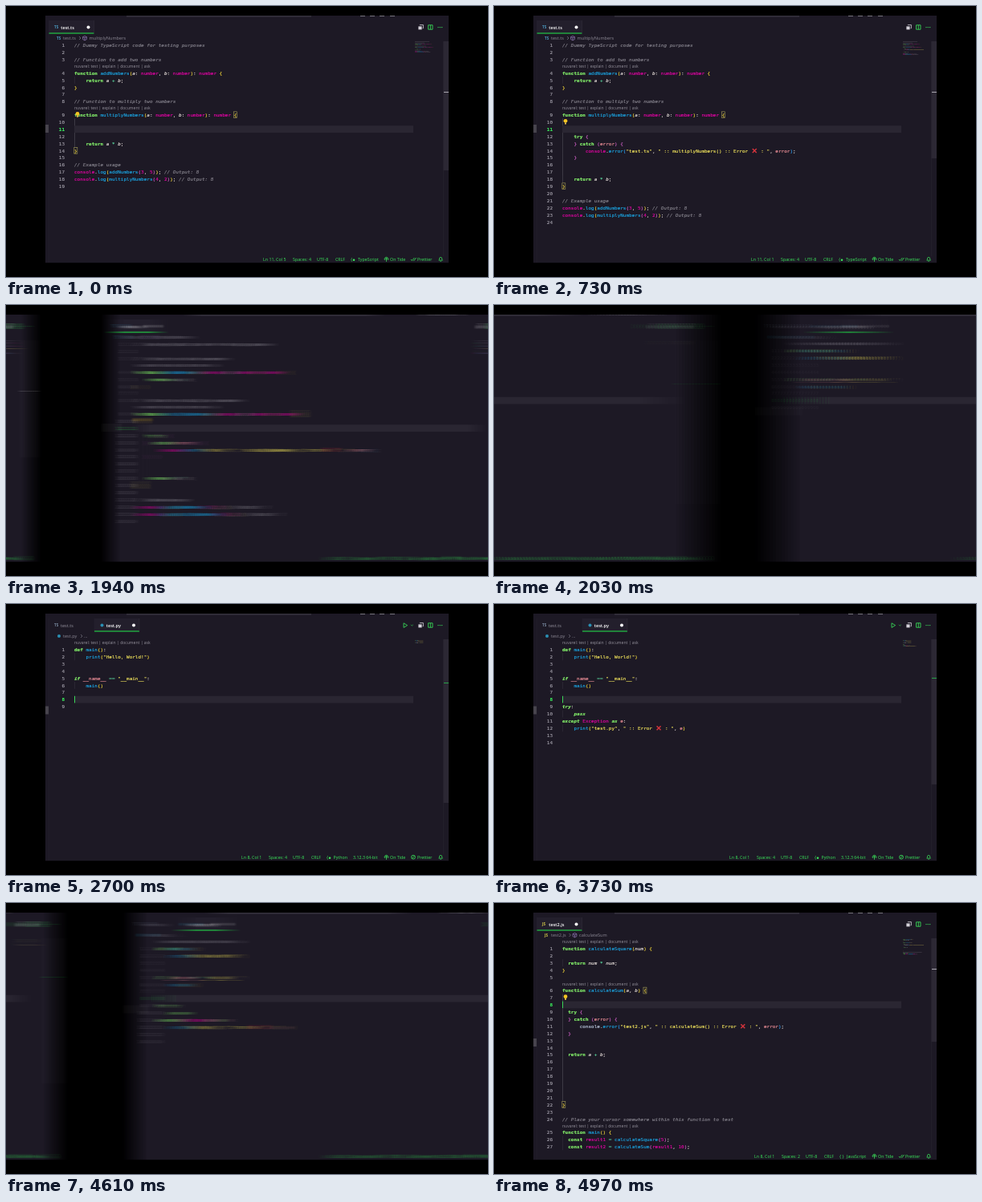
Animation, 600 px wide and 338 px high, one loop 5 s. Source, as an HTML page with a canvas:

```html
<!DOCTYPE html>
<html lang="en">
<head>
<meta charset="utf-8">
<title>Error handling snippets</title>
<style>
html, body { margin: 0; width: 100%; height: 100%; overflow: hidden; background: #000; }
canvas { display: block; }
</style>
</head>
<body>
<canvas id="stage" width="600" height="338"></canvas>
<script>
const W = 600, H = 338, LOOP = 5000;
const UI = '"Open Sans", sans-serif', MONO = '"DejaVu Sans Mono", monospace';
const CODE_X = 85, CODE_TOP = 44.6, CHAR = 3.612, LINE = 8.9, LENS = 7.8, SIZE = 6;
const BG = '#1d1925', GREEN = '#3bea5c', GREY = '#8d8a96', PALE = '#e4dcd8';
const KEY = '#86f56c', BLUE = '#1ba3e0', PINK = '#e005a2', YELLOW = '#f2e45c', ROSE = '#ea8d96';
const BRACKETS = ['#f5d93a', '#cf5fc6', '#2f9df0'];
const TOKEN = /(?<comment>\/\/.*)|(?<string>"[^"]*")|\b(?<key>function|return|def|if|const|try|catch|except|pass|as)\b|(?<call>\w+(?=\())|\b(?<type>number|Exception|console|result\d|\d+)\b|\b(?<param>a|b|num)\b|(?<word>\w+)|(?<bracket>[(){}])|(?<op>[+*=]+)|(?<rest>\s+|.)/g;
const COLORS = { comment: '#85828c', string: YELLOW, key: KEY, call: BLUE, type: PINK, param: PALE, word: ROSE, op: '#5fe6a8', rest: PALE };

let g;

function text(str, x, y, color, size = 5.6, style = '', family = UI) {
  g.save();
  g.translate(x, y + size * 0.36);
  g.scale(0.1, 0.1); // large type scaled down keeps fractional advances
  g.font = `${style} ${size * 10}px ${family}`;
  g.fillStyle = g.strokeStyle = color;
  g.fillText(str, 0, 0);
  g.lineWidth = 1.5;
  if (family === MONO) g.strokeText(str, 0, 0);
  g.restore();
}

function rect(x, y, w, h, color) {
  g.fillStyle = color;
  g.fillRect(x, y, w, h);
}

function dot(x, y, r, color) {
  g.fillStyle = color;
  g.beginPath();
  g.arc(x, y, r, 0, 7);
  g.fill();
}

function stroke(path, color, width = 0.8) {
  g.strokeStyle = color;
  g.lineWidth = width;
  g.stroke(new Path2D(path));
}

function fileIcon(s, x, y) {
  if (s.icon) text(s.icon, x - 3, y, s.tint, 4.6, 'bold');
  else dot(x, y, 2, s.tint);
}

function tokens(line, s, depth) {
  return [...line.matchAll(TOKEN)].map(m => {
    const kind = Object.keys(m.groups).find(k => m.groups[k] !== undefined), str = m[0];
    let color = COLORS[kind], style = '';
    if (kind === 'bracket') {
      const open = '({'.includes(str);
      if (!open) depth.n--;
      color = BRACKETS[depth.n % 3];
      if (open) depth.n++;
    }
    if (kind === 'comment' || kind === 'param') style = 'italic';
    if (kind === 'key') style = s.icon || str === 'def' ? 'bold' : 'italic bold';
    if (str === 'console' && s.icon === 'JS') color = '#b9c6dc';
    return { str, color, style };
  });
}

function drawToken(t, x, y) {
  t.str.split('❌').forEach((part, i) => {
    if (i) {
      stroke(`M${x + 2} ${y - 2.4}l5 5m0 -5l-5 5`, '#d5333c', 1.4);
      x += 8.9;
    }
    text(part, x, y, t.color, SIZE, t.style, MONO);
    x += part.length * CHAR;
  });
  return x;
}

function rowCenters(lines) {
  let top = CODE_TOP;
  return lines.map(line => {
    const h = line === '@' ? LENS : LINE;
    top += h;
    return top - h / 2;
  });
}

function drawCode(s) {
  const depth = { n: 0 }, rows = rowCenters(s.lines);
  let number = 0;
  const [from, to] = s.guide || [0, 0];
  rect(CODE_X, rows[from] - LINE / 2, 0.6, rows[to] - rows[from], '#54505c');
  s.lines.forEach((line, i) => {
    const y = rows[i];
    if (line === '@') {
      text('nuvarel: test | explain | document | ask', CODE_X, y, '#97949f', 5.08);
      return;
    }
    const label = String(++number), active = number === s.current;
    if (active) {
      rect(CODE_X, y - 4.4, 422, 8.8, '#2a2632');
      if (s.caret) rect(CODE_X, y - 4.4, 0.9, 8.6, GREEN);
    }
    text(label, 73 - label.length * CHAR, y, active ? GREEN : '#a09da8', SIZE, active ? 'bold' : '', MONO);
    const indent = line.search(/\S/);
    if (indent > 0) rect(CODE_X, y - LINE / 2, 0.5, LINE, '#393541');
    let x = CODE_X, mapX = 509;
    for (const t of tokens(line, s, depth)) {
      x = drawToken(t, x, y);
      const w = Math.min(t.str.length * 0.4, 535 - mapX);
      if (t.str.trim() && w > 0) {
        g.globalAlpha = 0.45;
        rect(mapX, 44.5 + i * 0.66, w, 0.5, t.color);
        g.globalAlpha = 1;
      }
      mapX += t.str.length * 0.4;
    }
  });
  for (const [row, col] of s.boxes || []) {
    g.strokeStyle = '#a7a05a';
    g.lineWidth = 0.6;
    g.strokeRect(CODE_X + col * CHAR - 0.2, rows[row] - 4, CHAR + 0.4, 7.8);
  }
  if (s.bulb) {
    const y = rows[s.bulb];
    dot(89, y - 1.4, 2.4, '#f4c522');
    rect(88, y + 0.8, 2, 2, '#d9b84a');
  }
}

function drawChrome(s) {
  rect(49, 12, 502, 308.5, BG);
  rect(150, 12, 230, 1.6, '#35313d');
  for (const x of [441, 453, 465, 478]) rect(x, 12, 6, 1, '#77747e');
  rect(53, 18, 0.5, 302, '#25212d');
  rect(49, s.marker, 4, 10, '#47444d');

  const tabX = s.other ? 109.5 : 53;
  rect(tabX, 18, 56.5, 16.5, '#231f2c');
  rect(tabX + 0.5, 33.4, 56, 1.2, '#22c545');
  if (s.other) {
    text('TS', 60, 26.5, '#7d8fa5', 4.6, 'bold');
    text(s.other, 68, 26.7, '#96939f');
  }
  fileIcon(s, tabX + 10, 26.5);
  text(s.file, tabX + 15.2, 26.7, '#fff', 5.6, '600');
  dot(tabX + 49.5, 26.5, 2, '#fff');
  rect(tabX + 56.2, 18, 0.5, 16, '#35313d');

  fileIcon(s, 66, 40);
  text(s.file, 71, 40, GREY);
  const cx = s.crumbX;
  stroke(`M${cx} 38l2 2l-2 2`, GREY, 0.6);
  if (s.crumb) {
    stroke(`M${cx + 7} 37.4l2.4 1.2v3l-2.4 1.2l-2.4 -1.2v-3zm-2.4 1.2l2.4 1.2l2.4 -1.2m-2.4 1.2v3`, '#a78bd0', 0.6);
    text(s.crumb, cx + 12.6, 40, GREY);
  } else text('…', cx + 4, 40, GREY);

  if (s.run) {
    stroke('M495 23.8l4.6 2.8l-4.6 2.8z', GREEN);
    stroke('M504 25.8l1.4 1.4l1.4 -1.4', GREEN, 0.6);
  }
  rect(513.4, 25.4, 4.2, 4, '#d5d2da');
  stroke('M515.2 24v-.4h4.2v4.2h-.8', '#d5d2da');
  stroke('M525.6 23.8h5.4v5.4h-5.4zm2.7 0v5.4', GREEN);
  for (const x of [538, 540.3, 542.6]) dot(x, 26.6, 0.7, GREEN);

  rect(544.5, 44, 6.5, s.thumb - 44, '#2c2834');
  rect(544.2, 44, 0.4, 268, '#2c2834');
  rect(545, s.tick, 6, 1, s.run ? '#27a447' : '#aaa7b0');
}

function drawStatus(s) {
  const y = 315.8;
  for (const [str, x] of [...s.status, ['On Tide', 478], ['Prettier', 512]]) text(str, x, y, GREEN, 5.3);
  const x = s.langX;
  text('{', x, y, GREEN, 5.6);
  if (s.icon === 'JS') text('}', x + 3.6, y, GREEN, 5.6);
  else dot(x + 4, y + 1, 1.3, GREEN);
  stroke('M471.6 317a2.3 2.3 0 1 1 3.8 0M473.5 315.4v3.4', GREEN);
  dot(473.5, 315.3, 1, GREEN);
  if (s.run) stroke('M504.6 315.7a2.4 2.4 0 1 0 4.8 0a2.4 2.4 0 1 0 -4.8 0m.8 1.6l3.2 -3.2', GREEN);
  else stroke('M504 316l1.4 1.6l3 -3.6m-1.2 3.2l.6 .4l2.8 -3.6', GREEN);
  stroke('M538.8 317.2l.7 -1.2v-1a1.6 1.6 0 0 1 3.2 0v1l.7 1.2zm1.7 1.3h1.2', GREEN, 0.7);
}

function newCanvas() {
  const c = document.createElement('canvas');
  c.width = W;
  c.height = H;
  return c.getContext('2d');
}

function render(s) {
  g = newCanvas();
  rect(0, 0, W, H, '#000');
  g.beginPath();
  g.rect(49, 12, 502, 308.5);
  g.clip();
  drawChrome(s);
  drawCode(s);
  drawStatus(s);
  return g.canvas;
}

const tryTs = `    try {
    } catch (error) {
        console.error("test.ts", " :: multiplyNumbers() :: Error ❌ : ", error);
    }

`;
const tsCode = snippet => `// Dummy TypeScript code for testing purposes

// Function to add two numbers
@
function addNumbers(a: number, b: number): number {
    return a + b;
}

// Function to multiply two numbers
@
function multiplyNumbers(a: number, b: number): number {


${snippet}
    return a * b;
}

// Example usage
console.log(addNumbers(3, 5)); // Output: 8
console.log(multiplyNumbers(4, 2)); // Output: 8
`.split('\n');

const pyCode = snippet => `@
def main():
    print("Hello, World!")


if __name__ == "__main__":
    main()


${snippet}`.split('\n');
const tryPy = `try:
    pass
except Exception as e:
    print("test.py", " :: Error ❌ : ", e)

`;

const jsCode = `@
function calculateSquare(num) {

  return num * num;
}

@
function calculateSum(a, b) {


  try {
  } catch (error) {
      console.error("test2.js", " :: calculateSum() :: Error ❌ : ", error);
  }


  return a + b;






}

// Place your cursor somewhere within this function to test
@
function main() {
  const result1 = calculateSquare(5);
  const result2 = calculateSum(result1, 10);`.split('\n');

const ts = (snippet, col, extra) => render({
  icon: 'TS', tint: '#4b9cc4', file: 'test.ts', crumb: 'multiplyNumbers', crumbX: 91,
  lines: tsCode(snippet), current: 11, marker: 148, tick: 107, langX: 429,
  status: [['Ln 11, Col ' + col, 320], ['Spaces: 4', 357], ['UTF-8', 387], ['CRLF', 410], ['TypeScript', 438]],
  ...extra
});
const py = (snippet, extra) => render({
  tint: '#2a8fb4', file: 'test.py', other: 'test.ts', crumbX: 93, run: true, caret: true,
  lines: pyCode(snippet), current: 8, marker: 127.5, langX: 399,
  status: [['Ln 8, Col 1', 293], ['Spaces: 4', 327], ['UTF-8', 357], ['CRLF', 380], ['Python', 407.5], ['3.12.3 64-bit', 432]],
  ...extra
});

const tsBefore = ts('', 5, { boxes: [[10, 55], [15, 0]], guide: [11, 15], bulb: 10, thumb: 205 });
const tsAfter = ts(tryTs, 1, { boxes: [[10, 55], [20, 0]], guide: [11, 20], bulb: 11, thumb: 190 });
const pyBefore = py('', { thumb: 248, tick: 98 });
const pyAfter = py(tryPy, { thumb: 225, tick: 92 });
const js = render({
  icon: 'JS', tint: '#d9cf4a', file: 'test2.js', crumb: 'calculateSum', crumbX: 93.5, caret: true,
  lines: jsCode, current: 8, marker: 169, tick: 82, thumb: 173, langX: 430,
  boxes: [[7, 28], [23, 0]], guide: [8, 23], bulb: 8,
  status: [['Ln 8, Col 1', 324], ['Spaces: 2', 358], ['UTF-8', 388], ['CRLF', 411], ['JavaScript', 439]]
});

// Each scene holds until the next start time; slides swap scenes at their midpoint.
const SLIDE = 500, SHUTTER = 17, BLUR_DEPTH = 4, SLIDES = [1780, 4432];
const CUTS = [[0, tsBefore], [700, tsAfter], [SLIDES[0] + SLIDE / 2, pyBefore], [3330, pyAfter], [SLIDES[1] + SLIDE / 2, js]];

const ease = p => p < 0.5 ? 4 * p ** 3 : 1 - 4 * (1 - p) ** 3;
const offset = t => SLIDES.reduce((x, start) => x + W * ease(Math.min(1, Math.max(0, (t - start) / SLIDE))), 0) % W;

const stage = document.getElementById('stage').getContext('2d');
const layers = Array.from({ length: BLUR_DEPTH + 1 }, newCanvas);

// Averages the picture over a time span by halving it, which keeps rounding errors small.
function blur(image, t, span, depth) {
  const layer = layers[depth];
  if (!depth) {
    const x = offset(t);
    layer.drawImage(image, x, 0);
    if (x) layer.drawImage(image, x - W, 0);
  } else {
    layer.globalAlpha = 1;
    layer.drawImage(blur(image, t - span / 4, span / 2, depth - 1), 0, 0);
    layer.globalAlpha = 0.5;
    layer.drawImage(blur(image, t + span / 4, span / 2, depth - 1), 0, 0);
  }
  return layer.canvas;
}

function frame(now) {
  const t = now % LOOP;
  const image = CUTS.filter(([start]) => t >= start).pop()[1];
  const moving = SLIDES.some(start => t > start - SHUTTER && t < start + SLIDE + SHUTTER);
  stage.drawImage(moving ? blur(image, t, SHUTTER, BLUR_DEPTH) : image, 0, 0);
  requestAnimationFrame(() => frame(performance.now() - begin));
}

const begin = performance.now();
frame(0);
</script>
</body>
</html>
```
